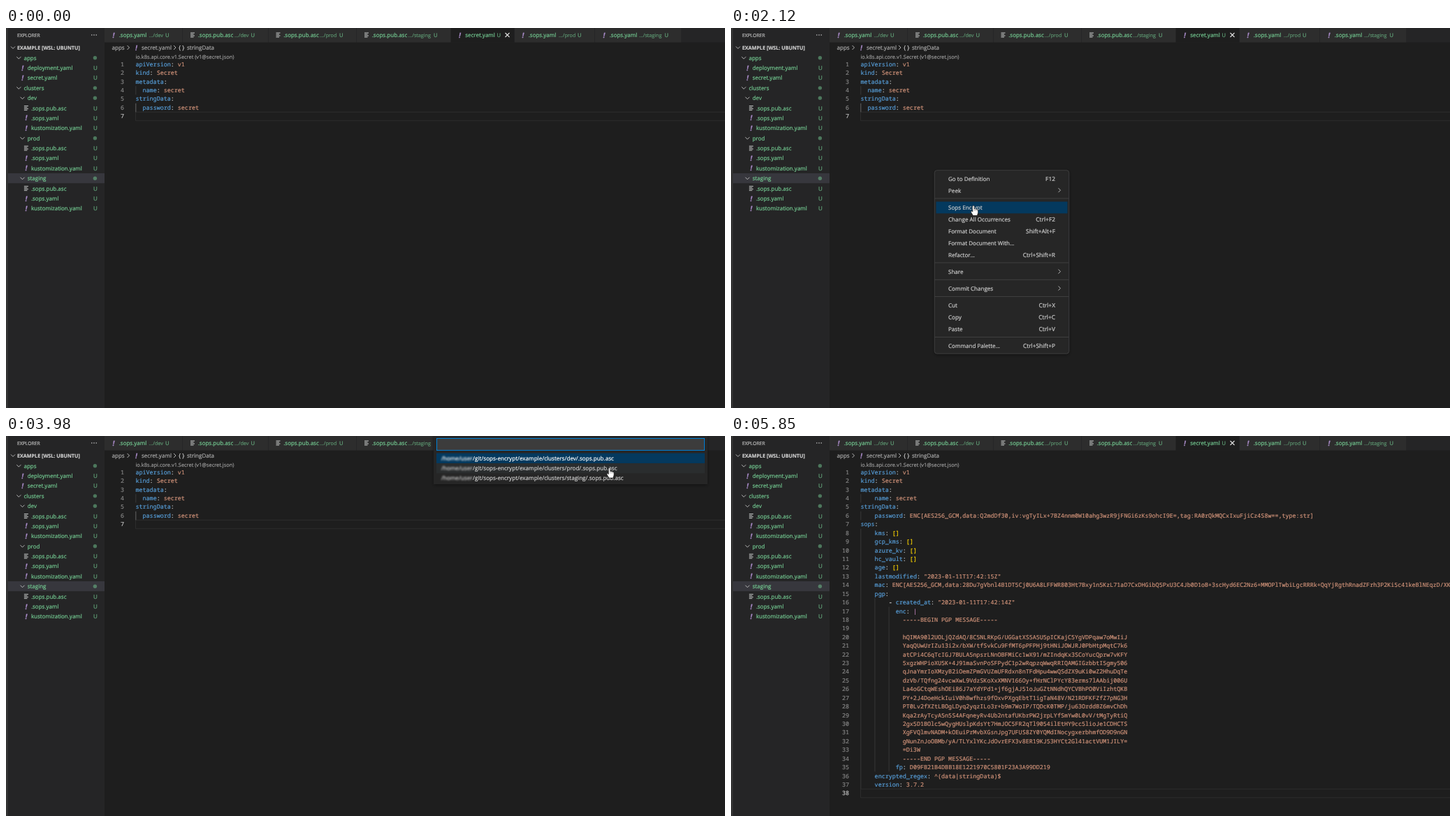
An HTML page that plays this animation: 1029x544 px, repeating every 6.26 s.

```html
<!DOCTYPE html>
<html lang="en">
<head>
<meta charset="utf-8">
<title>Encrypting a secret in the editor</title>
<style>
html, body { margin: 0; width: 100%; height: 100%; overflow: hidden; background: #1e1e1e; }
svg { display: block; width: 1029px; height: 544px; }
text { white-space: pre; text-rendering: geometricPrecision; font-family: "Open Sans", "Noto Sans", sans-serif; }
text, tspan { fill: currentColor; stroke: currentColor; stroke-width: .2px; }
.code { font: 8.38px "Noto Sans Mono", "DejaVu Sans Mono", monospace; }
</style>
</head>
<body>
<svg id="stage" viewBox="0 0 1029 544"></svg>
<script>
const GREEN = '#73c991', GREY = '#cccccc', KEY = '#569cd6', STR = '#ce9178';
const CHAR = 5.028, LINE = 12.42, LEFT = 185.5, ROW = 14.38;

const rect = (x, y, w, h, fill, more = '') =>
  `<rect x="${x}" y="${y}" width="${w}" height="${h}" fill="${fill}" ${more}/>`;
const text = (x, mid, s, color = GREY, size = 8.07, more = '') =>
  `<text x="${x}" y="${mid + 2.9}" color="${color}" font-size="${size}" ${more}>${s}</text>`;
const stroke = (d, color = '#c5c5c5', w = 0.9) =>
  `<path d="${d}" fill="none" stroke="${color}" stroke-width="${w}"/>`;
const down = (x, y) => stroke(`M${x - 3} ${y - 1.5}l3 3 3-3`);
const right = (x, y) => stroke(`M${x - 1.5} ${y - 3}l3 3-3 3`);
const group = (id, body) => `<g id="${id}" display="none">${body}</g>`;

function icon(x, y, name) {
  if (name.endsWith('.yaml'))
    return text(x, y + 0.6, '!', '#a98bc8', 10, 'font-weight="700" font-style="italic" text-anchor="middle"');
  return stroke(`M${x - 3} ${y - 3}h6m-6 2h4.5m-4.5 2h6m-6 2h4.5`, '#c4c7c6', 1);
}

// Explorer
function sidebar() {
  const tree = ['apps', ' deployment.yaml', ' secret.yaml', 'clusters'];
  for (const env of ['dev', 'prod', 'staging'])
    tree.push(' ' + env, '  .sops.pub.asc', '  .sops.yaml', '  kustomization.yaml');
  let out = rect(0, 0, 141, 544, '#252526') + rect(0, 0, 3, 544, '#333333') +
    rect(3, 208, 138, 14.2, '#37373d') +
    text(16, 9.7, 'EXPLORER', '#bbbbbb', 6.84) +
    [122.8, 126, 129.2].map(x => `<circle cx="${x}" cy="10" r=".8" fill="${GREY}"/>`).join('') +
    down(10, 28) + text(16, 27.7, 'EXAMPLE [WSL: UBUNTU]', GREY, 7.2, 'font-weight="700"');
  tree.forEach((item, i) => {
    const name = item.trim(), depth = item.length - name.length, y = 42.7 + i * ROW;
    const x = 25.5 + depth * 5.2;
    out += text(x, y, name, GREEN, 8);
    if (name.includes('.')) {
      out += icon(x - 7, y, name) + text(125, y, 'U', GREEN, 8, 'opacity=".8"');
    } else {
      out += down(x - 7.2, y) + `<circle cx="127.4" cy="${y}" r="2.7" fill="${GREEN}" opacity=".5"/>`;
    }
  });
  return out;
}

function tabs() {
  // left edge, icon, name, folder x, folder, status x
  const list = [
    [141, 154, '.sops.yaml', 204.5, 'dev', 228],
    [253, 267, '.sops.pub.asc', 327, 'dev', 350.5],
    [376, 389.5, '.sops.pub.asc', 449, 'prod', 477],
    [502, 516, '.sops.pub.asc', 575.5, 'staging', 612],
    [637, 649.5, 'secret.yaml', 0, '', 702.5],
    [728, 740, '.sops.yaml', 791, 'prod', 818],
    [843, 856, '.sops.yaml', 906, 'staging', 942.5]
  ];
  let out = rect(141, 0, 888, 20.5, '#252526');
  list.forEach(([x, ix, name, fx, folder, ux], i) => {
    const end = i < 6 ? list[i + 1][0] : 967, active = !folder;
    out += rect(x, 0, end - x - 0.7, 20.5, active ? '#1e1e1e' : '#2d2d2d') +
      icon(ix, 10, name) + text(ix + 7.7, 10, name, GREEN, 8) +
      text(ux, 10, 'U', GREEN, 7.6, 'opacity=".8"');
    if (folder) out += text(fx, 10, '.../' + folder, GREEN, 7.2, 'opacity=".65"');
  });
  return out + stroke('M714.5 7l6 6m0-6l-6 6', '#e0e0e0', 1.1);
}

function breadcrumbs() {
  const grey = '#a9a9a9';
  return text(151.5, 28.3, 'apps', grey) + right(175, 28) + icon(186.5, 28, '.yaml') +
    text(194, 28.3, 'secret.yaml', grey) + right(241.5, 28) +
    text(247, 28.3, '{ }', GREY, 8.2) + text(259, 28.3, 'stringData', grey) +
    text(LEFT, 41, 'io.k8s.api.core.v1.Secret (v1@secret.json)', '#999999', 7.42);
}

function paint(line) {
  const span = (s, color) => s && `<tspan color="${color}">${s}</tspan>`;
  const m = line.match(/^(\s*(?:- )?)(\w+)(:)(.*)$/);
  if (!m) return span(line, STR);
  const color = { ' []': '#ffd700', ' |': '#c586c0' }[m[4]] || STR;
  return span(m[1], '#d4d4d4') + span(m[2], KEY) + span(m[3], '#d4d4d4') + span(m[4], color);
}

// guides: [column, first line, last line, colour]
function editor(lines, guides) {
  const last = lines.length, mid = n => 52 + (n - 1) * LINE;
  let out = stroke(`M1030 ${mid(last) - 6.2}H${LEFT}v${LINE}H1030`, '#303030', 0.8);
  for (const [col, from, to, color = '#404040'] of guides)
    out += rect(LEFT + col * CHAR, mid(from) - 6.2, 0.7, (to - from + 1) * LINE, color);
  lines.forEach((line, i) => {
    const y = mid(i + 1) + 2.8;
    out += `<text class="code" x="169" y="${y}" text-anchor="end" color="${i + 1 === last ? '#c6c6c6' : '#858585'}">${i + 1}</text>` +
      `<text class="code" x="${LEFT}" y="${y}">${paint(line)}</text>`;
  });
  return out;
}

const plain = `apiVersion: v1
kind: Secret
metadata:
  name: secret
stringData:
  password: secret
`.split('\n');

const message = `-----BEGIN PGP MESSAGE-----

hQIMA90l2UOLjQZdAQ/8C5NLRKpG/UGGatXS5A5U5pICKajC5YgVDPqaw7oMwIiJ
YaqQUwUrIZu13i2x/bXW/tfSvkCu9FfMT6pPFPHj9tHNiJOWJRJ0PbHtpMqtC7k6
atCPi4C6qTcIGJ7BULA5npsrLNnOBFMiCc1wX91/mZIndqKx3SCoYucQprw7vKFY
5xgzWHPioXU5K+4J91maSvnPoSFPydC1p2wRqpzqWwqRRIQAMGIGzbbtI5gmy506
qJnaYmrIoXMzyB2iOemZPmGVUZmUFRdxn8nTFdHpu4wwQSdZX9uKi0wZ2HhuDqTe
dzVb/TQfng24vcwXwL9VdzSKoXxXMNV166Oy+fHrNClPYcY83erms7lAAbij006U
La4oGCtqWEshOEi86J7aYdYPd1+jf6gjAJ51oJuGZtNNdhQYCVBhPO0ViIzhtQKB
PY+2J4DoeHckIuiV0hBwfhzs9fOxvPXgqEbtT1igTaN48V/N21RDFKFZfZ7pNG3H
PT0Lv2fXZtLBOgLDyq2yqzILo3r+b9m7WoIP/TQDcK0TMP/ju63OrddBZ6mvChDh
Kqa2rAyTcyA5n5S4AFqneyRv4Ub2ntafUKbrPW2jrpLYfSmYw0L0vV/tMgTyRtiQ
2gx5D1BOlc5wQygHUslpKdsYt7HmJOC5FR2qTl9054ilEtHY9cc5lioJe1CDHCTS
XgFVQlmvNADM+kOEuiPrMvbXGsnJpg7UFUS8ZY0YQMdINocygxerbhmfOD9D9nGN
gNunZnJoOBMb/yA/TLYxlYKcJdOvrEFX3v8ER19KJ53HYCt2Gl41actVUM1JILY=
=Di3W
-----END PGP MESSAGE-----`.split('\n').map(s => ' '.repeat(12) + s);

const sealed = [...`apiVersion: v1
kind: Secret
metadata:
    name: secret
stringData:
    password: ENC[AES256_GCM,data:Q2mdDf30,iv:vgTyILx+7BZ4nnm0W10ahg3wzR9jFNGi6zKs9ohcI9E=,tag:RA0rQkMQCxIxuFjiCz4S8w==,type:str]
sops:
    kms: []
    gcp_kms: []
    azure_kv: []
    hc_vault: []
    age: []
    lastmodified: "2023-01-11T17:42:15Z"
    mac: ENC[AES256_GCM,data:28Du7gVbnl4B1DT5Cj0U6A8LFFWR803Ht7Bxy1n5KzL71aD7CxDHGibQ5PxU3C4Jb0D1oB+3scHyd6EC2Nz6+MMOPlTwbiLgcRRRk+QqYjRgthRnadZFrh3P2Ki5c41keBlNEqzD/XK
    pgp:
        - created_at: "2023-01-11T17:42:14Z"
          enc: |`.split('\n'), ...message, ...`          fp: D09FB21B4DBB18E1221970C5801F23A3A99DD219
    encrypted_regex: ^(data|stringData)$
    version: 3.7.2
`.split('\n')];

// Context menu
const items = [
  [216, 'Go to Definition', 'F12'], [232.6, 'Peek', '>'],
  [257, 'Sops Encrypt', ''], [274, 'Change All Occurrences', 'Ctrl+F2'],
  [291, 'Format Document', 'Shift+Alt+F'], [308, 'Format Document With...', ''],
  [325, 'Refactor...', 'Ctrl+Shift+R'], [349, 'Share', '>'], [373, 'Commit Changes', '>'],
  [397.5, 'Cut', 'Ctrl+X'], [414.5, 'Copy', 'Ctrl+C'], [431.5, 'Paste', 'Ctrl+V'],
  [455.5, 'Command Palette...', 'Ctrl+Shift+P']
];

function menu() {
  return rect(291.3, 203.7, 192.4, 262.4, '#252526', 'rx="3.5" stroke="#454545" stroke-width=".8" filter="url(#shadow)"') +
    rect(293.5, 0, 188, 16.8, '#04395e', 'id="menuHover"') +
    [244, 336, 360.3, 384.5, 442.6].map(y => rect(291.5, y - 0.4, 192, 0.8, '#454545')).join('') +
    items.map(([y, label, key]) => text(311, y, label) +
      (key === '>' ? right(470, y - 0.4) : text(464, y, key, GREY, 8.4, 'text-anchor="end"'))).join('');
}

// Key file picker
const picks = ['dev', 'prod', 'staging'];
const pickY = i => 31.8 + i * ROW;

function picker() {
  return rect(612, -4, 392, 73, '#252526', 'filter="url(#shadow)"') +
    rect(616.5, 3.5, 383, 17, '#3c3c3c', 'stroke="#007fd4"') +
    rect(620.5, 6.5, 0.9, 11, '#e0e0e0', 'id="caret"') +
    rect(616, pickY(0) - 7.2, 384, ROW, '#04395e') +
    rect(616, 0, 384, ROW, '#2a2d2e', 'id="pickHover"') +
    picks.map((env, i) => {
      const color = i ? GREY : '#ffffff';
      return text(623, pickY(i), '/home/user', color, 8.1, 'filter="url(#smear)"') +
        text(668, pickY(i), `/git/sops-encrypt/example/clusters/${env}/.sops.pub.asc`, color, 8.1);
    }).join('');
}

const pointers =
  group('beam', stroke('M-2-5H-.6L0-4.4.6-5H2M0-4.4V4.4M-2 5H-.6L0 4.4.6 5H2', '#e6e6e6', 1)) +
  group('arrow', '<path d="M0 0V9.6L2.2 7.6 3.7 11 5.2 10.3 3.8 7H6.8Z" fill="#fff" stroke="#000" stroke-width=".6"/>') +
  group('hand', '<path d="M-1.2 .8Q0-.8 1.2 .8V5Q2.6 4.2 3.3 5.4 4.6 4.8 5.2 6 6.5 5.6 6.6 7V10.5L5.4 14.5H-.6L-3.6 9.4Q-3.8 7.6-2.2 8.2L-1.2 9.2Z" fill="#fff" stroke="#000" stroke-width=".6"/>' +
    stroke('M1.2 5v3M3.3 5.6V8M5.2 6.2V8', '#555', 0.5));

const stage = document.getElementById('stage');
stage.innerHTML = `<defs>
  <filter id="shadow" x="-10%" y="-20%" width="120%" height="150%"><feDropShadow dx="0" dy="1.5" stdDeviation="2.6" flood-color="#000" flood-opacity=".4"/></filter>
  <filter id="smear" x="-10%" y="-30%" width="120%" height="160%"><feGaussianBlur stdDeviation="1.3 .8"/></filter>
</defs>` + rect(0, 0, 1029, 544, '#1e1e1e') + sidebar() + tabs() + breadcrumbs() +
  group('before', editor(plain, [[0, 4, 4], [0, 6, 6, '#808080']])) +
  group('after', editor(sealed, [[0, 4, 4], [0, 6, 6], [0, 8, 37], [4, 16, 35], [8, 17, 35]])) +
  group('menu', menu()) + group('picker', picker()) + pointers;

const $ = id => document.getElementById(id);
const show = (id, on) => $(id).setAttribute('display', on ? 'inline' : 'none');

// Pointer path: [tick, x, y]
const path = [
  [2, 915, 522], [11, 312, 225], [16, 295, 198], [18, 295, 198], [19, 294.5, 204],
  [26, 343.5, 227.5], [28, 346, 238], [32, 347, 254], [36, 347, 254], [43, 597, 281],
  [50, 874, 66], [53, 863.5, 60], [58, 863.5, 45.5], [64, 863.5, 45.5], [71, 832, 71],
  [77, 832, 71], [87, 1013, 542]
];

function pointerAt(n) {
  const i = path.findIndex(p => p[0] >= n);
  if (i < 1) return path[Math.max(i, 0)].slice(1);
  const [a, x0, y0] = path[i - 1], [b, x1, y1] = path[i];
  const u = (n - a) / (b - a), e = u * u * (3 - 2 * u);
  return [x0 + (x1 - x0) * e, y0 + (y1 - y0) * e];
}

function hover(id, centers, half, y) {
  const c = centers.find(c => Math.abs(c - y) < half);
  show(id, c !== undefined);
  if (c !== undefined) $(id).setAttribute('y', c - half);
}

const LOOP = 6260, TICK = 1000 / 15;

function draw(now) {
  const t = now % LOOP, n = Math.floor((t + 21) / TICK);
  const menuOpen = n >= 15 && n < 34, pickerOpen = n >= 35 && n < 68, sealedNow = n >= 79;
  show('before', !sealedNow);
  show('after', sealedNow);
  show('menu', menuOpen);
  show('picker', pickerOpen);

  const visible = n >= 2 && n <= 87;
  const [x, y] = visible ? pointerAt(n) : [0, 0];
  let kind = 'beam';
  if (menuOpen && n >= 19) kind = y > 207 ? 'hand' : 'arrow';
  if (pickerOpen && y < 69 && x > 612) kind = 'hand';
  for (const id of ['beam', 'arrow', 'hand']) show(id, visible && id === kind);
  $(kind).setAttribute('transform', `translate(${x} ${y})`);

  const hand = kind === 'hand' ? y : -99;
  hover('menuHover', items.map(i => i[0]), 8.4, hand);
  hover('pickHover', [pickY(1), pickY(2)], ROW / 2, hand);
  show('caret', (t - 2260) % 1000 < 500);
}

function loop(now) {
  draw(now);
  requestAnimationFrame(loop);
}
draw(0);
requestAnimationFrame(loop);
</script>
</body>
</html>
```
